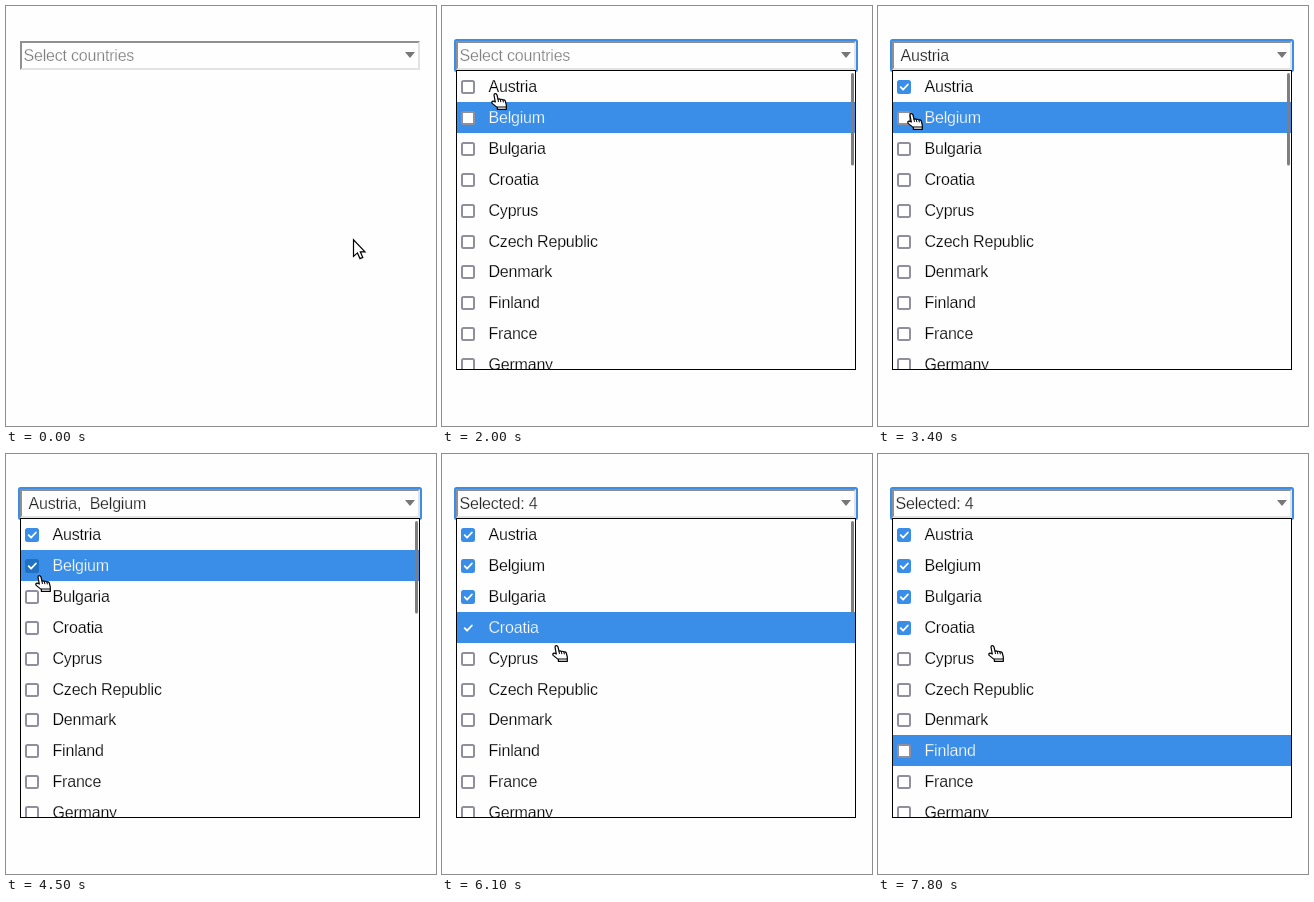
Animation, 430 px wide and 420 px high, one loop 8000 ms. Source, as an HTML page:

```html
<!DOCTYPE html>
<html lang="en">
<head>
<meta charset="utf-8">
<style>
  html, body { margin: 0; width: 100%; height: 100%; overflow: hidden; background: #fefefe; }
  svg { display: block; width: 430px; height: 420px; }
  text { font: 16px "Liberation Sans", Arial, sans-serif; letter-spacing: -0.2px;
         white-space: pre; stroke: #fefefe; stroke-width: .25px; }
</style>
</head>
<body>
<svg viewBox="0 0 430 420">
  <defs><clipPath id="inside"><rect x="15" y="65" width="398" height="298"/></clipPath></defs>
  <rect id="ring" x="13" y="34" width="402" height="31" rx="1.5" fill="none" stroke="#3a8ee8" stroke-width="2"/>
  <rect x="14" y="35" width="400" height="29" fill="#fefefe"/>
  <path d="M414 35V64H14L16 62H412V37Z" fill="#e3e3e3"/>
  <path d="M14 64V35H414L412 37H16V62Z" fill="#909090"/>
  <path d="M399 46H409L404 52Z" fill="#777"/>
  <text id="value" y="55"></text>
  <g id="list">
    <rect x="14.5" y="64.5" width="399" height="299" fill="#fefefe" stroke="#000"/>
    <g id="rows" clip-path="url(#inside)"></g>
    <rect id="bar" x="409" y="67" width="3" height="92.5" rx="1.5" fill="#7f7f7f"/>
  </g>
  <path id="arrow" d="M.5 .8V17.5L4.4 13.9L7 19.6L9.8 18.4L7.3 12.8H12Z" fill="#fff" stroke="#000" stroke-width="1.2"/>
  <g id="hand" fill="#fff" stroke="#000" stroke-width="1.2" stroke-linejoin="round" stroke-linecap="round">
    <path d="M4.3 9L3 2.2Q3 .6 4.3 .6T6 2L7 6.2Q8.3 5.4 9.4 6.5Q10.8 5.8 12 7Q13.6 6.5 14.3 8L15.3 12V16.4H6.4V14.6L1.2 10.4Q.3 9 1.4 8.4T4.3 9Z"/>
    <path d="M7 6.2L7.4 8.6M9.4 6.5L9.8 8.8M12 7L12.3 9M6.4 14H15" fill="none" stroke-width="1"/>
  </g>
</svg>
<script>
const LOOP = 8000, STEP = 100, BLUE = '#3a8ee8', PAPER = '#fefefe';
const TOP = 65, PITCH = 30.9;
const countries = ['Austria', 'Belgium', 'Bulgaria', 'Croatia', 'Cyprus',
  'Czech Republic', 'Denmark', 'Finland', 'France', 'Germany'];
const clicks = [3000, 4100, 5000, 5700];

// Pointer moves: start, end, destination and sag of the path
const origin = { x: 347, y: 233 };
const moves = [
  { from: 100, to: 900, x: 395, y: 53 },
  { from: 1500, to: 2100, x: 21, y: 77, sag: 50 },
  { from: 2300, to: 2500, x: 22, y: 88 },
  { from: 3100, to: 3400, x: 29, y: 107 },
  { from: 4300, to: 4800, x: 28, y: 146 },
  { from: 5100, to: 5500, x: 28, y: 180 },
  { from: 5700, to: 5900, x: 90, y: 180 },
  { from: 6000, to: 6100, x: 110, y: 191 }
];

const $ = id => document.getElementById(id);
const show = (el, on) => { el.style.display = on ? '' : 'none'; };
const clamp = v => Math.max(0, Math.min(1, v));
const smooth = f => f * f * (3 - 2 * f);
const rowTop = i => Math.round(TOP + PITCH * i);

function set(el, attrs) {
  for (const k in attrs) el.setAttribute(k, attrs[k]);
  return el;
}

function add(tag, attrs) {
  const el = document.createElementNS('http://www.w3.org/2000/svg', tag);
  return $('rows').appendChild(set(el, attrs));
}

const rows = countries.map((name, i) => {
  const y = rowTop(i);
  const back = add('rect', { x: 15, y, width: 398, height: rowTop(i + 1) - y, fill: BLUE });
  const box = add('rect', { x: 20, y: y + 10, width: 12, height: 12, rx: 1.5, 'stroke-width': 2 });
  const tick = add('path', { d: `M22.7 ${y + 16.2}l2.4 2.5 4.8-5.2`, fill: 'none',
    stroke: '#fff', 'stroke-width': 1.8, 'stroke-linecap': 'round', 'stroke-linejoin': 'round' });
  const label = add('text', { x: 46.5, y: y + 21 });
  label.textContent = name;
  return { back, box, tick, label };
});

function pointer(t) {
  let { x, y } = origin;
  for (const m of moves) {
    const f = smooth(clamp((t - m.from) / (m.to - m.from)));
    x += (m.x - x) * f;
    y += (m.y - y) * f + (m.sag || 0) * Math.sin(Math.PI * f);
  }
  return { x: Math.round(x), y: Math.round(y) };
}

function drawValue(picked) {
  const few = picked.length > 0 && picked.length < 4;
  $('value').textContent = few ? picked.join(',  ')
    : picked.length ? `Selected: ${picked.length}` : 'Select countries';
  set($('value'), { x: few ? 22.5 : 17.5, fill: picked.length ? '#222' : '#808080' });
}

function drawRows(t) {
  // The page reacts one step after the pointer
  const p = pointer(t - STEP);
  const under = Math.max(0, Math.floor((p.y - TOP) / PITCH));
  const keys = Math.max(0, Math.floor((t - 6900) / 300));
  const inBox = p.x < 33 && p.y > rowTop(under) + 9 && p.y < rowTop(under) + 23;

  rows.forEach(({ back, box, tick, label }, i) => {
    const active = i === under + keys;
    const over = inBox && i === under;
    const checked = t >= clicks[i];
    const edge = checked ? (over ? '#2270c2' : BLUE) : (over ? '#676774' : '#8f8f9d');
    show(back, active);
    show(tick, checked);
    set(box, { stroke: edge, fill: checked ? edge : '#fff' });
    set(label, { fill: active ? '#fff' : '#000' });
    label.style.stroke = active ? BLUE : PAPER;
  });
}

function draw(time) {
  const t = Math.floor((time % LOOP) / STEP) * STEP;
  show($('ring'), t >= 1100);
  show($('list'), t >= 1200);
  drawValue(countries.filter((name, i) => t >= clicks[i]));
  drawRows(t);
  set($('bar'), { opacity: clamp((7700 - t) / 400) });

  const { x, y } = pointer(t);
  const inList = t >= 1200 && y >= TOP;
  show($('arrow'), !inList);
  show($('hand'), inList);
  set($(inList ? 'hand' : 'arrow'), { transform: `translate(${x} ${y})` });
}

const start = performance.now();
function play() {
  draw(performance.now() - start);
  requestAnimationFrame(play);
}
play();
</script>
</body>
</html>
```
